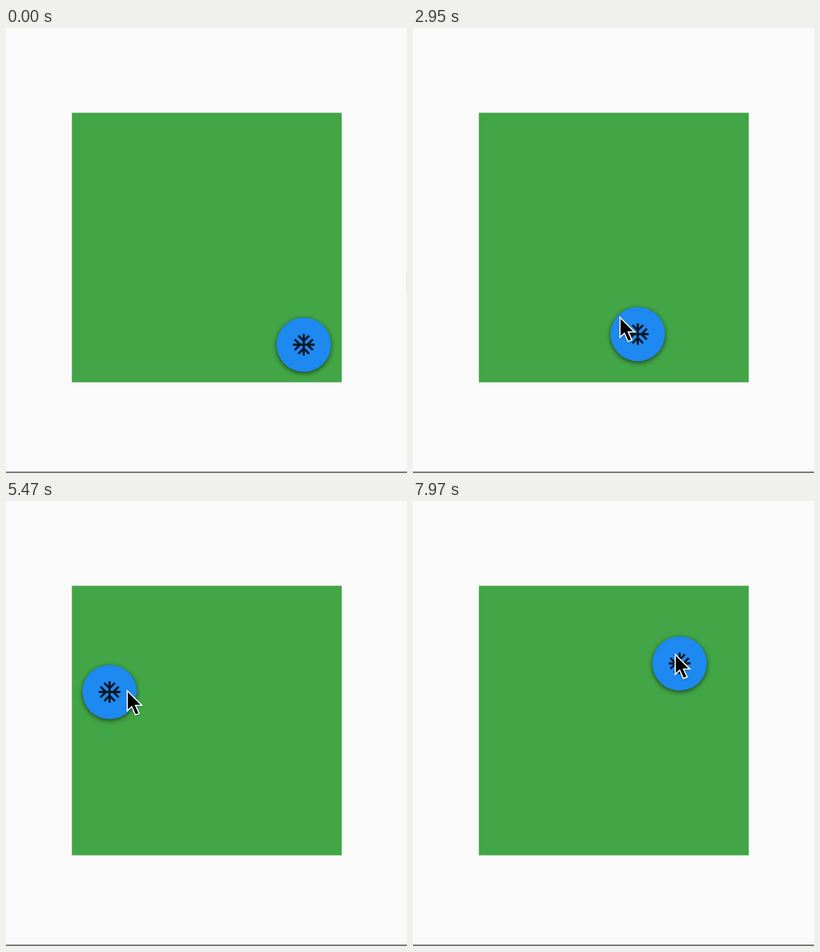
An HTML page that plays this animation: 540 px wide and 600 px high, repeating every 7990 ms.

```html
<!DOCTYPE html>
<html lang="en">
<head>
<meta charset="utf-8">
<title>Draggable button</title>
<style>
  html, body { margin: 0; width: 100%; height: 100%; overflow: hidden; background: #fafafa; }
  svg { display: block; width: 540px; height: 600px; }
  #disc { fill: #1d89f1; filter: drop-shadow(0 2px 3px rgba(0, 0, 0, .48)) drop-shadow(0 1px 2px rgba(0, 0, 0, .14)); }
  #flake { fill: none; stroke: #0b1722; stroke-width: 2; }
  #cursor { fill: #000; stroke: #fff; stroke-width: 3.2; stroke-miterlimit: 8; paint-order: stroke;
            filter: drop-shadow(0 1px 1px rgba(0, 0, 0, .25)); }
</style>
</head>
<body>
<svg viewBox="0 0 540 600">
  <rect width="540" height="600" fill="#fafafa"/>
  <rect x="88.7" y="114.3" width="363.4" height="363.4" fill="#42a546"/>
  <rect y="598" width="540" height="2" fill="#77777a"/>
  <g id="button">
    <circle id="disc" r="36.6"/>
    <g id="flake" transform="scale(1.46)">
      <path id="arm" d="M0 0V-10M-4.95 -8.37L0 -3.42L4.95 -8.37"/>
      <use href="#arm" transform="rotate(90)"/>
      <use href="#arm" transform="rotate(180)"/>
      <use href="#arm" transform="rotate(270)"/>
    </g>
  </g>
  <path id="cursor" d="M1.7 3.8V27L7.2 21.9L12.3 33.4L15.9 31.9L10.8 20.7H18.6Z"/>
</svg>
<script>
const LOOP = 7990;
const LAG = 140; // the button trails the pointer

const smooth = u => u * u * (3 - 2 * u);
const out = power => u => 1 - (1 - u) ** power;
const clamp = (v, lo, hi) => Math.min(hi, Math.max(lo, v));
const inBounds = ([x, y]) => [clamp(x, 139.5, 401), clamp(y, 165, 427)];

const entry = [540, 328];
const home = [401, 427];

// Pointer gestures; bow bends the straight path into an arc
const moves = [
  { start: 370, end: 1050, to: [387, 424], ease: out(2) },
  { start: 1050, end: 1670, to: [399, 427], bow: [18, -5], ease: smooth },
  { start: 2345, end: 3930, to: [203, 259], bow: [0, 70], ease: out(2), drag: true },
  { start: 4440, end: 5180, to: [114, 257.5], ease: smooth, drag: true },
  { start: 5260, end: 6010, to: [137.5, 242.5], bow: [77, -1], ease: smooth },
  { start: 6370, end: 7830, to: [357, 204], bow: [0, -4], ease: out(1.72), drag: true },
  { start: 7830, end: LOOP, to: [352, 205], ease: smooth, drag: true }
];

// Chain the gestures: each starts where the last ended and grabs the button where it rests
let tip = entry, rest = home;
for (const move of moves) {
  move.from = tip;
  tip = move.to;
  if (move.drag) {
    move.grip = rest.map((v, i) => v - move.from[i]);
    rest = inBounds(tip.map((v, i) => v + move.grip[i]));
  }
}

function along({ start, end, from, to, bow = [0, 0], ease }, t) {
  const p = ease(clamp((t - start) / (end - start), 0, 1));
  return from.map((v, i) => v + (to[i] - v) * p + bow[i] * Math.sin(Math.PI * p));
}

const latest = (list, t) => list.filter(move => move.start <= t).pop();
const drags = moves.filter(move => move.drag);

function pointerAt(t) {
  const move = latest(moves, t);
  return move ? along(move, t) : entry;
}

function buttonAt(t) {
  const late = t - LAG;
  const move = latest(drags, late);
  return move ? inBounds(along(move, late).map((v, i) => v + move.grip[i])) : home;
}

const button = document.getElementById("button");
const cursor = document.getElementById("cursor");
const place = (node, [x, y]) =>
  node.setAttribute("transform", `translate(${x.toFixed(2)} ${y.toFixed(2)})`);

const origin = performance.now();
function tick() {
  const t = (performance.now() - origin) % LOOP;
  place(button, buttonAt(t));
  place(cursor, pointerAt(t));
  requestAnimationFrame(tick);
}
tick();
</script>
</body>
</html>
```
